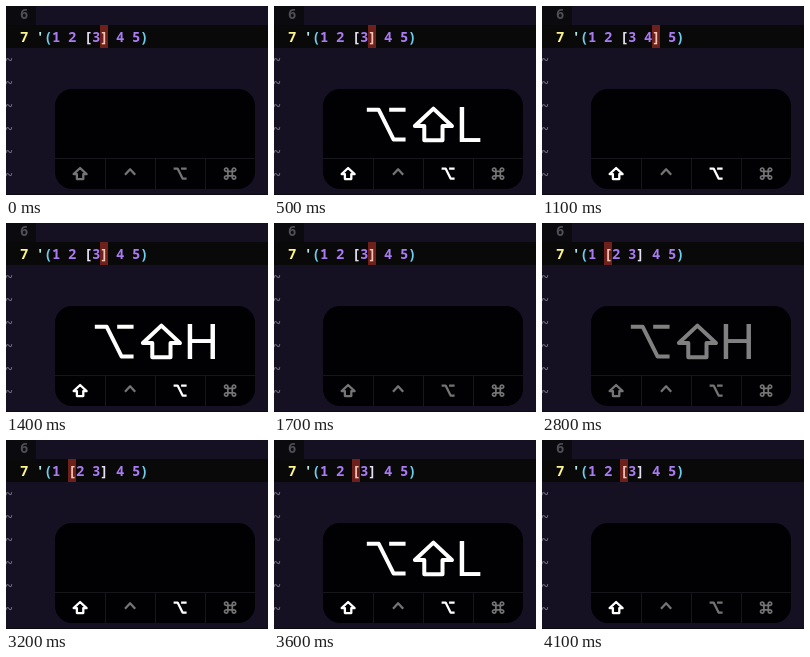
An HTML page that plays this animation: 262x189 px, repeating every 4.2 s.

```html
<!DOCTYPE html>
<html lang="en">
<head>
<meta charset="utf-8">
<title>Slurp and barf</title>
<style>
  html, body { margin: 0; width: 100%; height: 100%; overflow: hidden; background: #151022; }
  svg { display: block; width: 100vw; height: 100vh; }
  .code { font: 600 14px "Noto Sans Mono", monospace; letter-spacing: -.4px; white-space: pre; }
  .key { font: 400 48px Inter, sans-serif; fill: #fff; }
  .icon { fill: none; stroke-linejoin: round; vector-effect: non-scaling-stroke; }
</style>
</head>
<body>
<svg id="stage" viewBox="0 0 262 189"></svg>
<script>
const LOOP = 4200, STEP = 100, CELL = 8, LEFT = 30;
const DIM = '#747474', LIT = '#fff';
const stage = document.getElementById('stage');

function add(parent, tag, attrs, text) {
  const el = document.createElementNS('http://www.w3.org/2000/svg', tag);
  for (const name in attrs) el.setAttribute(name, attrs[name]);
  if (text) el.textContent = text;
  return parent.appendChild(el);
}
const rect = (x, y, width, height, fill, rx = 0) =>
  add(stage, 'rect', { x, y, width, height, fill, rx });
const code = (x, y, fill, text) =>
  add(stage, 'text', { class: 'code', x, y, fill }, text);

// Modifier glyphs, centred on the origin, in the size of the key row
const GLYPHS = {
  shift: 'M0-5.6L6.5.5H3.2V5.5H-3.2V.5H-6.5Z',
  control: 'M-5.1 1.1L0-4.3L5.1 1.1',
  option: 'M-6.5-5H-2.5L2.5 5H6.5M1-5H6.5',
  command: 'M-2.2-2.2H2.2V2.2H-2.2ZM-2.2-2.2H-3.8A1.7 1.7 0 1 1-2.2-3.8Z' +
    'M2.2-2.2V-3.8A1.7 1.7 0 1 1 3.8-2.2ZM2.2 2.2H3.8A1.7 1.7 0 1 1 2.2 3.8Z' +
    'M-2.2 2.2V3.8A1.7 1.7 0 1 1-3.8 2.2Z'
};
const icon = (parent, name, x, y, scale, width, stroke) =>
  add(parent, 'path', {
    class: 'icon', d: GLYPHS[name], stroke, 'stroke-width': width,
    transform: `translate(${x} ${y}) scale(${scale})`
  });

// Editor
rect(0, 0, 262, 189, '#151022');
rect(0, 0, LEFT, 19, '#0b0a0e');
rect(0, 19, 262, 23, '#09090a');
rect(0, 188, 262, 1, '#0c0a13');
code(14, 12.5, '#4f4d55', '6');
code(14, 35.5, '#fdf58a', '7').style.fontWeight = 700;
for (let i = 0; i < 6; i++) code(-1.2, 59 + i * 23, '#6d687a', '~').style.fontWeight = 700;
const cursor = rect(0, 19, CELL, 23, '#6e211b');
const line = code(LEFT, 35.5, '#fff', '');

// Key display
rect(49, 83, 200, 100, '#010103', 17);
rect(49, 152, 200, 1, '#17171b');
for (const x of [99, 149, 199]) rect(x, 153, 1, 30, '#17171b');
const mods = {};
Object.keys(GLYPHS).forEach((name, i) => {
  mods[name] = icon(stage, name, 74.1 + i * 50, 167.6, 1, name === 'command' ? 1.7 : 2.3, DIM);
});
const combo = add(stage, 'g', {});
icon(combo, 'option', 112.2, 118.7, 2.98, 4, LIT);
icon(combo, 'shift', 159.4, 118.6, 2.85, 4, LIT);
const letter = add(combo, 'text', { class: 'key', x: 181.6, y: 136 });

// Each press: modifiers down, key shown, edit applied, modifiers up, key gone
const PRESSES = [
  { down: 300, show: 500, edit: 600, up: 800, gone: 800, key: 'L', code: "'(1 2 [3 4] 5)", at: 10 },
  { down: 1100, show: 1300, edit: 1400, up: 1600, gone: 1700, key: 'H', code: "'(1 2 [3] 4 5)", at: 8 },
  { down: 2200, show: 2400, edit: 2500, up: 2700, gone: 2900, key: 'H', code: "'(1 [2 3] 4 5)", at: 4 },
  { down: 3200, show: 3400, edit: 3500, up: 3700, gone: 3900, key: 'L', code: "'(1 2 [3] 4 5)", at: 6 }
];
const START = { code: "'(1 2 [3] 4 5)", at: 8 };
const FADE = 200;
const NUDGE = { L: 0, H: -4 }; // keeps the combination centred

function tint(ch, active) {
  if (active) return '#f3c3b4';
  if (/\d/.test(ch)) return '#a87bf0';
  if (/[()]/.test(ch)) return '#6fcdec';
  return ch === "'" ? '#b5ece8' : '#e6e1f2';
}

let shown = null;
function setLine(state) {
  if (state === shown) return;
  shown = state;
  line.textContent = '';
  [...state.code].forEach((ch, i) =>
    add(line, 'tspan', { fill: tint(ch, i === state.at) }, ch));
  cursor.setAttribute('x', LEFT + state.at * CELL);
}

function draw(ms) {
  const t = Math.floor((ms % LOOP) / STEP) * STEP;
  const within = (a, b) => t >= a && t < b;
  setLine(PRESSES.filter(p => t >= p.edit).pop() || START);

  const held = PRESSES.some(p => within(p.down, p.up));
  mods.option.setAttribute('stroke', held ? LIT : DIM);
  mods.shift.setAttribute('stroke', held || t >= 4100 ? LIT : DIM);

  const press = PRESSES.find(p => within(p.show, p.gone));
  combo.setAttribute('opacity', press ? Math.min(1, (press.gone - t) / FADE) : 0);
  if (press) {
    letter.textContent = press.key;
    combo.setAttribute('transform', `translate(${NUDGE[press.key]} 0)`);
  }
}

const begin = performance.now();
function tick() {
  draw(performance.now() - begin);
  requestAnimationFrame(tick);
}
tick();
</script>
</body>
</html>
```
